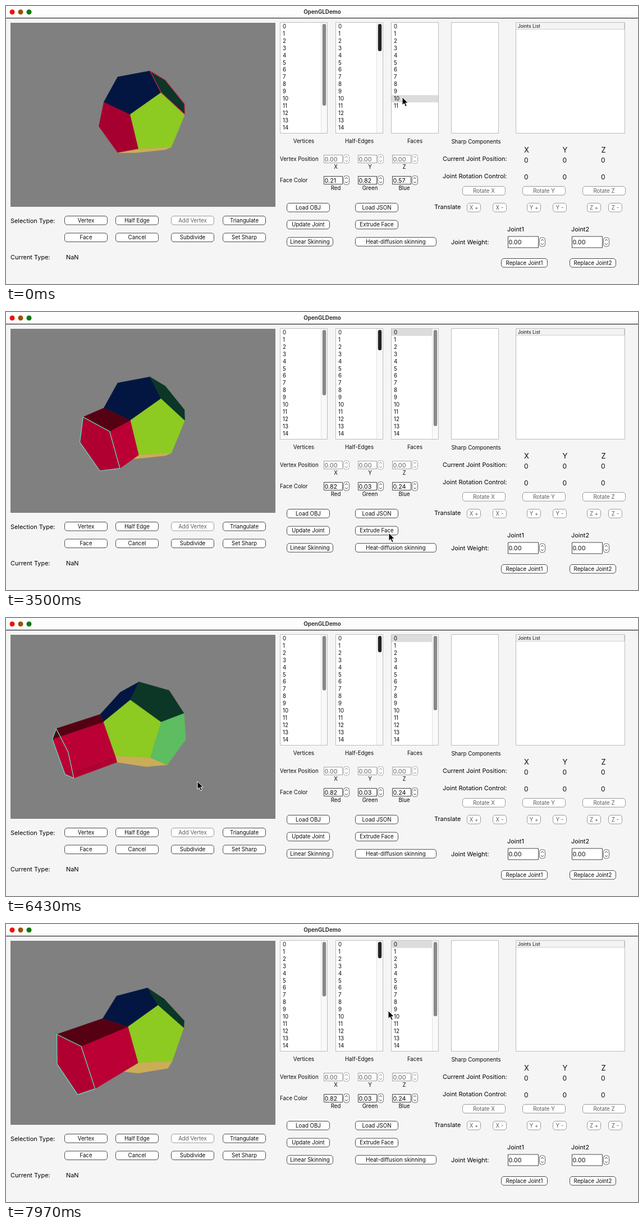
These frames come from a looping animation (1126x497 px, 8 s). An HTML page with a canvas:

```html
<!DOCTYPE html>
<html lang="en">
<head>
<meta charset="utf-8">
<title>OpenGLDemo</title>
<style>
  html, body { margin: 0; width: 100%; height: 100%; overflow: hidden; background: #f5f5f5; }
  canvas, svg { position: absolute; left: 0; top: 0; width: 1126px; height: 497px; }
  text { font-family: Inter, "Open Sans", sans-serif; white-space: pre; }
</style>
</head>
<body>
<canvas></canvas>
<svg viewBox="0 0 1126 497"><g id="labels"></g>
  <path id="cursor" d="M0 0V14.2L3.3 11.2L5.8 16.8L8.2 15.7L5.8 10.3H10.2Z" fill="#000" stroke="#fff" stroke-width="1"/>
</svg>
<script>
const W = 1126, H = 497, LOOP = 8000;
const PICK = 1050, EXTRUDE = [3500, 4750], DRAG = [5950, 7500];
const canvas = document.querySelector('canvas'), ctx = canvas.getContext('2d');
const labels = document.getElementById('labels'), cursor = document.getElementById('cursor');
const dpr = window.devicePixelRatio || 1;
canvas.width = W * dpr;
canvas.height = H * dpr;

// ---- text layer ----
function label(str, x, y, size = 9.7, anchor = 'start', fill = '#0a0a0a', weight = 400) {
  const el = document.createElementNS('http://www.w3.org/2000/svg', 'text');
  const attrs = { x, y: y + size * 0.36, 'font-size': size, 'text-anchor': anchor, fill, 'font-weight': weight };
  for (const k in attrs) el.setAttribute(k, attrs[k]);
  el.textContent = str;
  labels.append(el);
  return el;
}
const mid = (str, x, y, size, fill, weight) => label(str, x, y, size, 'middle', fill, weight);

const GRAY = '#5c5c5c';
const buttons = [];
function button(str, x, y, w, off) {
  buttons.push([x, y, w, off]);
  mid(str, x + w / 2, y + 8.2, 9.7, off ? GRAY : '#0a0a0a');
}
const spins = [];
function spin(x, y, w, h, value, off) {
  spins.push([x, y, w, h, off]);
  return label(value, x + 1.5, y + h / 2 + 0.5, 10.8, 'start', off ? GRAY : '#0a0a0a');
}

mid('OpenGLDemo', 563.5, 10.5, 9.8, '#333', 700);
const rowY = i => 36.3 + 12.95 * i;
const faceRows = [];
for (let i = 0; i < 15; i++) {
  label(i, 493, rowY(i));
  label(i, 592, rowY(i));
  faceRows.push(label(i, 691, rowY(i)));
}
label('Joints List', 912, 36.2, 8.3);
mid('Vertices', 530.5, 241.5);
mid('Half-Edges', 629.5, 241.5);
mid('Faces', 728.5, 241.5);
mid('Sharp Components', 837.5, 243);
label('Vertex Position', 488, 273.5);
label('Face Color', 488, 311.5);

const rgb = ['Red', 'Green', 'Blue'].map((name, i) => {
  const x = 566 + 61 * i;
  spin(x, 266, 34, 15, '0.00', true);
  mid('XYZ'[i], x + 21.5, 287.3);
  mid(name, x + 21.5, 325.3);
  return spin(x, 304, 34, 15, '', false);
});
[927.5, 996, 1064.5].forEach((x, i) => {
  mid('XYZ'[i], x, 257, 13);
  mid('0', x - 0.8, 275.5, 12);
  mid('0', x - 0.8, 306, 12);
  button('Rotate ' + 'XYZ'[i], 813 + 107 * i, 322, 77, true);
});
[['Current Joint Position:', 778, 273.5], ['Joint Rotation Control:', 778, 304], ['Translate', 763, 359.5],
 ['Joint Weight:', 793, 422.5], ['Joint1', 893, 399], ['Joint2', 1007, 399],
 ['Selection Type:', 8, 384.5], ['Current Type:', 8, 449], ['NaN', 107, 449]
].forEach(([s, x, y]) => label(s, x, y, 10.9, 'start', '#000'));

['X +', 'X -', 'Y +', 'Y -', 'Z +', 'Z -'].forEach((s, i) =>
  button(s, [821, 867, 928, 974, 1035, 1073][i], 352, 25, true));
['Vertex', 'Half Edge', 'Add Vertex', 'Triangulate', 'Face', 'Cancel', 'Subdivide', 'Set Sharp'].forEach((s, i) =>
  button(s, [104, 195, 294, 386][i % 4], i < 4 ? 375 : 405.5, 77, i === 2));
['Load OBJ', 'Update Joint', 'Linear Skinning'].forEach((s, i) => button(s, 500, 352 + 30.6 * i, i === 2 ? 83 : 77));
['Load JSON', 'Extrude Face', 'Heat-diffusion skinning'].forEach((s, i) => button(s, 622, 352 + 30.6 * i, i === 2 ? 145 : 77));
button('Replace Joint1', 882, 451, 83);
button('Replace Joint2', 1004, 451, 83);
spin(894, 411.5, 55, 21, '0.00');
spin(1008, 411.5, 55, 21, '0.00');

// ---- widgets ----
function box(x, y, w, h, fill, stroke) {
  ctx.fillStyle = fill;
  ctx.fillRect(x, y, w, h);
  if (!stroke) return;
  ctx.strokeStyle = stroke;
  ctx.strokeRect(x + 0.5, y + 0.5, w - 1, h - 1);
}
function pill(x, y, w, h, r, fill, stroke) {
  ctx.beginPath();
  ctx.roundRect(x, y, w, h, r);
  ctx.fillStyle = fill;
  ctx.fill();
  if (!stroke) return;
  ctx.strokeStyle = stroke;
  ctx.stroke();
}
function chevron(x, y, dir) {
  ctx.beginPath();
  ctx.moveTo(x - 2.3, y + dir);
  ctx.lineTo(x, y - dir);
  ctx.lineTo(x + 2.3, y + dir);
  ctx.stroke();
}
function scrollBar(x, count, color) {
  box(x + 73, 30, 11, 197, '#f9f9f9');
  box(x + 73, 30, 1, 197, '#e2e2e2');
  pill(x + 75.8, 32, 6.4, 2925 / count, 3.2, color);
}

function drawWindow(t, steps) {
  box(0, 0, W, H, '#f5f5f5');
  box(0, 0, W, 21, '#fdfdfd');
  box(0, 21, W, 1.2, '#222');
  ['#ee1208', '#955200', '#067a06'].forEach((c, i) => pill(6.5 + 15 * i, 6.3, 9, 9, 4.5, c));
  ctx.lineWidth = 1;
  for (const x of [488, 587, 686, 793]) box(x, 29, 85, 199, '#fff', '#bdbdbd');
  box(908, 29, 195, 199, '#fff', '#bdbdbd');
  box(909, 30, 193, 12, '#f3f3f3');
  box(909, 41, 193, 1, '#d0d0d0');
  box(1101, 31, 1, 10, '#c8c8c8');
  box(687, rowY(t < PICK ? 10 : 0) - 6.5, 83, 13, '#dcdcdc');
  scrollBar(488, 20 + 5 * steps, '#888');
  scrollBar(587, 60 + 20 * steps, '#222');
  if (steps) scrollBar(686, 12 + 5 * steps, '#888');
  for (const [x, y, w, off] of buttons) pill(x + 0.5, y + 0.5, w - 1, 15.6, 4.5, '#fff', off ? '#999' : '#4a4a4a');
  for (const [x, y, w, h, off] of spins) {
    box(x, y, w, h, '#fff', off ? '#a0a0a0' : '#444');
    const c = y + h / 2;
    pill(x + w + 1.5, c - 8, 10, 16, 4, '#fff', off ? '#aaa' : '#666');
    ctx.strokeStyle = off ? '#777' : '#222';
    chevron(x + w + 6.5, c - 3.6, 1);
    chevron(x + w + 6.5, c + 3.6, -1);
  }
}

// ---- solid ----
const PHI = (1 + Math.sqrt(5)) / 2, G = 1 / PHI, R3 = Math.sqrt(3);
const dot = (a, b) => a[0] * b[0] + a[1] * b[1] + a[2] * b[2];
const cross = (a, b) => [a[1] * b[2] - a[2] * b[1], a[2] * b[0] - a[0] * b[2], a[0] * b[1] - a[1] * b[0]];
const add = (a, b, k = 1) => a.map((v, i) => v + k * b[i]);
const scale = (a, k) => a.map(v => v * k);
const unit = a => scale(a, 1 / Math.hypot(...a));
const combine = (basis, v) => basis.reduce((s, a, i) => add(s, a, v[i]), [0, 0, 0]);

// Resting pose of the model axes in camera space
const yaw0 = 22.3 * Math.PI / 180, tilt = 45.5 * Math.PI / 180;
const sy = Math.sin(yaw0), cy = Math.cos(yaw0), st = Math.sin(tilt), ct = Math.cos(tilt);
const axes = [[sy * ct, st, cy * ct], [-cy, 0, sy], [sy * st, -ct, cy * st]];
const pose = v => combine(axes, v);

const corners = [];
for (const a of [-1, 1]) for (const b of [-1, 1]) {
  for (const c of [-1, 1]) corners.push([a, b, c]);
  corners.push([0, a * G, b * PHI], [a * PHI, 0, b * G], [a * G, b * PHI, 0]);
}
const verts = corners.map(v => scale(pose(v), 1 / R3));
const faces = [
  [0, PHI, 1, '#a60030'], [PHI, 1, 0, '#031641'], [1, 0, PHI, '#8dca22'], [PHI, -1, 0, '#0c3626'],
  [-1, 0, PHI, '#cbad57'], [0, -PHI, 1, '#5dbd60'], [0, PHI, -1, '#98803e'], [0, -PHI, -1, '#2e6a58'],
  [1, 0, -PHI, '#1c2434'], [-1, 0, -PHI, '#6b5a32'], [-PHI, 1, 0, '#c9a852'], [-PHI, -1, 0, '#8a7a44']
].map(([x, y, z, color]) => {
  const n = unit(pose([x, y, z]));
  const ring = verts.filter(v => dot(v, n) > 0.7);
  const u = unit(add(ring[0], n, -dot(ring[0], n))), w = cross(n, u);
  const angle = v => Math.atan2(dot(v, w), dot(v, u));
  return { n, color, pts: ring.sort((a, b) => angle(a) - angle(b)) };
});
const [red, blue, green, dark, yellow] = faces;
const sideColor = new Map([[blue, '#560014'], [green, '#ba0034'], [yellow, '#b00030']]);

function extruded(depth) {
  const tip = red.pts.map(p => add(p, red.n, depth));
  const sides = red.pts.map((p, i) => {
    const j = (i + 1) % 5, q = red.pts[j], m = add(p, q);
    const next = faces.filter(f => f !== red).sort((a, b) => dot(b.n, m) - dot(a.n, m))[0];
    return { color: sideColor.get(next) || '#3a000c', pts: [p, q, tip[j], tip[i]] };
  });
  return [...sides, { color: '#b00032', pts: tip }];
}

const FOCAL = 397, DIST = 5;
const project = ([x, y, z]) => [243.5 + x * FOCAL / (DIST - z), 194.5 - y * FOCAL / (DIST - z)];
function trace(pts) {
  ctx.beginPath();
  pts.forEach(p => ctx.lineTo(...project(p)));
  ctx.closePath();
}

function drawSolid(t, steps, basis) {
  box(8, 30, 472, 329, '#808080');
  const turn = pts => pts.map(p => combine(basis, p));
  const paint = ({ pts, color }) => {
    const q = turn(pts), n = cross(add(q[1], q[0], -1), add(q[2], q[1], -1));
    if (dot(n, add([0, 0, DIST], q[0], -1)) <= 0) return;
    trace(q);
    ctx.fillStyle = ctx.strokeStyle = color;
    ctx.lineWidth = 0.5;
    ctx.fill();
    ctx.stroke();
  };
  const body = steps ? faces.slice(1) : faces;
  const arm = steps ? extruded(0.5 * steps) : [];
  const armInFront = combine(basis, red.n)[2] * DIST > dot(red.n, red.pts[0]);
  (armInFront ? [...body, ...arm] : [...arm, ...body]).forEach(paint);
  const picked = t < PICK ? dark.pts : steps ? arm[5].pts : red.pts;
  trace(turn(picked));
  ctx.strokeStyle = t < PICK ? '#d8245e' : '#5ce8cc';
  ctx.lineWidth = 1.2;
  ctx.lineJoin = 'round';
  ctx.stroke();
}

// ---- motion ----
const path = [
  [0, 706, 163], [250, 706, 163], [850, 704, 36], [1250, 704, 36], [2470, 779, 414], [2650, 778, 417],
  [3250, 682, 395], [4850, 682, 395], [5700, 411, 283], [5870, 411, 283], [5950, 405, 282], [6430, 341, 292],
  [6560, 335, 292], [7170, 443, 295], [7500, 401, 294], [7620, 405, 290], [7970, 681, 155], [8000, 684, 152]
];
function mouseAt(t) {
  const i = Math.max(1, path.findIndex(k => k[0] >= t));
  const [t0, x0, y0] = path[i - 1], [t1, x1, y1] = path[i];
  const k = (t - t0) / (t1 - t0), e = k * k * (3 - 2 * k);
  return [x0 + (x1 - x0) * e, y0 + (y1 - y0) * e];
}

// Each bit of drag turns the solid about the screen axes, so the turns add up along the path.
const TURN = 0.0103;
function spun([x, y, z], yaw, pitch) {
  const c = Math.cos(yaw), s = Math.sin(yaw), cp = Math.cos(pitch), sp = Math.sin(pitch);
  const d = z * c - x * s;
  return [x * c + z * s, y * cp - d * sp, y * sp + d * cp];
}
function basisAt(t) {
  const end = Math.min(t, DRAG[1]), STEP = 10;
  let basis = [[1, 0, 0], [0, 1, 0], [0, 0, 1]], [x, y] = mouseAt(DRAG[0]);
  for (let s = DRAG[0]; s < end; s += STEP) {
    const [nx, ny] = mouseAt(Math.min(s + STEP, end));
    basis = basis.map(v => spun(v, (nx - x) * TURN, (ny - y) * -TURN));
    [x, y] = [nx, ny];
  }
  return basis;
}

function frame(now) {
  const t = now % LOOP;
  const steps = EXTRUDE.filter(e => t >= e).length;
  const [mx, my] = mouseAt(t);
  ctx.setTransform(dpr, 0, 0, dpr, 0, 0);
  drawWindow(t, steps);
  drawSolid(t, steps, basisAt(t));
  const values = t < PICK ? ['0.21', '0.82', '0.57'] : ['0.82', '0.03', '0.24'];
  rgb.forEach((el, i) => { el.textContent = values[i]; });
  faceRows.forEach((el, i) => el.setAttribute('visibility', i < 12 || steps ? 'visible' : 'hidden'));
  cursor.setAttribute('transform', `translate(${mx} ${my})`);
  requestAnimationFrame(frame);
}
requestAnimationFrame(frame);
</script>
</body>
</html>
```
